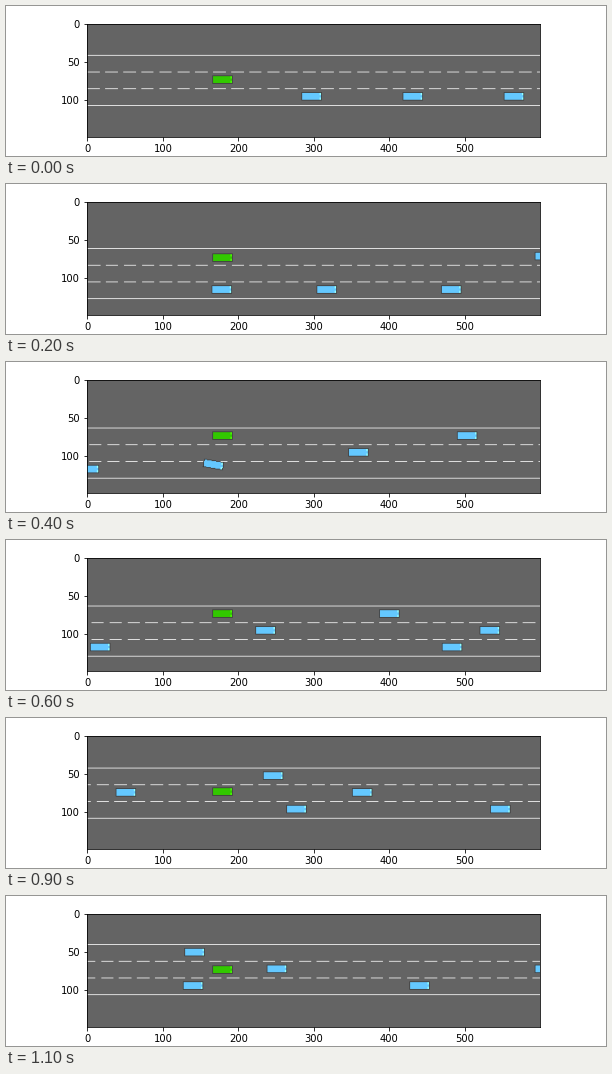
Recreate the animation shown at these times as a matplotlib script. Size 600x150 px, loop 1200 ms.

```python
import numpy as np
import matplotlib.pyplot as plt
from matplotlib.animation import FuncAnimation

W, H = 600, 150
DPI = 72
STEPS = 12
LANE = 22                    # lane width in road pixels
DASH, PERIOD = 16.5, 23.815  # stripe length and spacing
CRUISE = 2                   # step at which the green car reaches its speed

GREY, WHITE, EDGE = (100, 100, 100), (255, 255, 255), (60, 60, 60)
GREEN, BLUE = (50, 200, 0), (100, 200, 255)

ys, xs = np.mgrid[0:H, 0:W]


def settle(t):
    """Lane change of the green car: most of the way in one step."""
    return 1 - 0.08 ** max(t, 0)


def road_top(t):
    return round(42 + LANE * (settle(t - 1) - settle(t - 8)) - t / 13)


def wave(t, start, length):
    return np.sin(np.pi * np.clip((t - start) / length, 0, 1)) ** 2


def merge(t):
    """Move from lane 2 to lane 1."""
    return 2 - wave(t, CRUISE, 4) if t < 4 else 1


def swerve(t):
    """Start to leave lane 2, then turn back."""
    return 2 - 0.36 * wave(t, CRUISE, 3)


class Car:
    def __init__(self, x, lane, speed, early=None):
        self.x, self.speed = x, speed
        self.early = early or speed
        self.lane = lane if callable(lane) else lambda t: lane

    def pose(self, t):
        dt = t - CRUISE
        x = self.x - dt * (self.early if dt < 0 else self.speed)
        y = road_top(t) + LANE * (self.lane(t) + 0.5) - 1
        slope = (self.lane(t + 0.1) - self.lane(t - 0.1)) / 0.2
        return x, y, np.clip(slope / 2, -0.16, 0.16)


# Place at the cruise step, lane, speed relative to the green car
CARS = [
    Car(178, 2, 88, early=59.5),
    Car(317, swerve, 75, early=57),
    Car(482, merge, 61.6, early=41.5),
    Car(606, 0, 51.5),
    Car(758, 2, 68.7),
    Car(759, 1, 56.4),
    Car(923, 2, 53.7),
    Car(1092, 1, 54),
]


def lighten(color):
    return [min(int(c / 0.68), 255) for c in color]


def draw_car(img, color, x, y, heading=0):
    dx, dy = xs - round(x), ys - round(y)
    c, s = np.cos(heading), np.sin(heading)
    u, v = c * dx + s * dy, c * dy - s * dx
    body = (abs(u) < 13.5) & (abs(v) < 5.5)
    inner = (abs(u) < 12.5) & (abs(v) < 4.5)
    img[body] = EDGE
    img[inner] = color
    img[inner & (u > 10.5) & (abs(v) > 1.5)] = lighten(color)


def scene(t):
    img = np.full((H, W, 3), GREY, dtype=np.uint8)
    top = road_top(t)
    img[[top, top + 3 * LANE]] = WHITE
    dashes = (np.arange(W) - 0.15 * t ** 2) % PERIOD < DASH
    for k in (1, 2):
        img[top + k * LANE, dashes] = WHITE
    for car in CARS:
        draw_car(img, BLUE, *car.pose(t))
    draw_car(img, GREEN, 179, 74)
    return img


plt.rcParams.update({"font.family": "DejaVu Sans", "font.size": 10})
fig = plt.figure(figsize=(W / DPI, H / DPI), dpi=DPI, facecolor="white")
ax = fig.add_axes([0.125, 0.125, 0.775, 0.755])
view = ax.imshow(scene(0))
ax.set_xticks(range(0, W, 100))
ax.set_yticks(range(0, H, 50))


def update(t):
    view.set_data(scene(t))
    return [view]


anim = FuncAnimation(fig, update, frames=STEPS, interval=100, repeat=True,
                     repeat_delay=0, blit=False)
plt.show()
```
